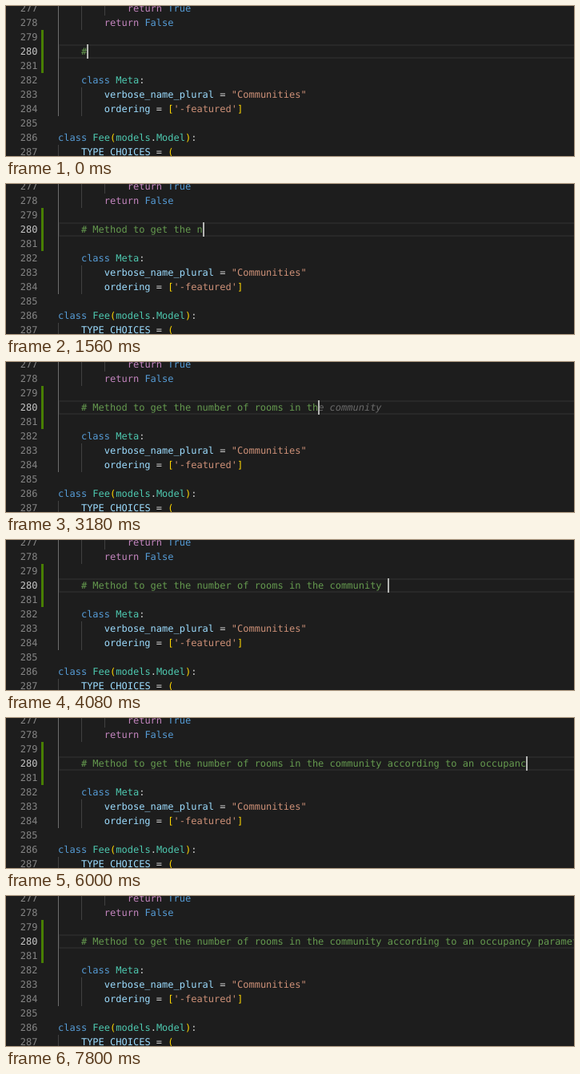
Animation of 710x188 px, one loop 8000 ms. Source, as an HTML page:

```html
<!DOCTYPE html>
<html lang="en">
<head>
<meta charset="utf-8">
<title>Typing a comment</title>
<style>
html, body { margin: 0; width: 100%; height: 100%; overflow: hidden; background: #1d1d1d; }
body { position: relative; }
pre, i.bar { position: absolute; margin: 0; }
pre {
  top: -6px; color: #d4d4d4;
  font: 12px/18px "DejaVu Sans Mono", monospace;
  text-rendering: geometricPrecision; font-variant-ligatures: none;
}
#nums { left: 17.8px; color: #858585; }
#nums b { font-weight: normal; color: #c6c6c6; }
#code { left: 65px; }
#row { position: absolute; left: 65px; right: -4px; top: 48px; height: 14px; border: 2px solid #282828; }
.bar { width: 1px; background: #404040; }
.k { color: #569cd6; }
.f { color: #c586c0; }
.t { color: #4ec9b0; }
.v { color: #9cdcfe; }
.s { color: #ce9178; }
.p { color: #ffd700; }
#typed { color: #659a4f; }
#ghost { color: #6a6a6a; font-style: italic; }
#caret { display: inline-block; position: relative; width: 0; height: 0; }
#caret::after {
  content: ""; position: absolute; left: 0; top: -13px;
  width: 2px; height: 18px; background: #b4b5b3;
}
</style>
</head>
<body>
<div id="row"></div>
<i class="bar" style="left:44px;top:30px;width:3px;height:54px;background:#487e02"></i>
<i class="bar" style="left:65px;top:0;height:138px;background:#6c6c6c"></i>
<i class="bar" style="left:65px;top:174px;height:14px"></i>
<i class="bar" style="left:94px;top:0;height:30px"></i>
<i class="bar" style="left:94px;top:102px;height:36px"></i>
<i class="bar" style="left:123px;top:0;height:12px"></i>
<pre id="nums">277
278
279
<b>280</b>
281
282
283
284
285
286
287</pre>
<pre id="code">            <span class="f">return</span> <span class="k">True</span>
        <span class="f">return</span> <span class="k">False</span>

    <span id="typed"></span><span id="caret"></span><span id="ghost"></span>

    <span class="k">class</span> <span class="t">Meta</span>:
        <span class="v">verbose_name_plural</span> = <span class="s">"Communities"</span>
        <span class="v">ordering</span> = <span class="p">[</span><span class="s">'-featured'</span><span class="p">]</span>

<span class="k">class</span> <span class="t">Fee</span><span class="p">(</span><span class="t">models</span>.<span class="t">Model</span><span class="p">)</span>:
    <span class="v">TYPE_CHOICES</span> = <span class="p">(</span></pre>
<script>
const LOOP = 8000, STEP = 60;
const hint = "# Method to get the number of rooms in the community";
const text = hint + " according to an occupancy parameter";
const hintFrom = 31;
// [time in ms, characters typed]
const keys = [
  [0, 1], [840, 10], [1680, 23], [2340, 31], [3360, 44], [4080, 53], [4200, 54],
  [5040, 66], [5220, 66], [5400, 68], [6000, 77], [6060, 78], [6960, 78],
  [7020, 79], [7260, 79], [7800, 86], [LOOP, 86]
];
const [typed, caret, ghost] = ["typed", "caret", "ghost"].map(id => document.getElementById(id));

function typedCount(t) {
  const i = keys.findIndex(k => k[0] > t);
  const [t0, n0] = keys[i - 1], [t1, n1] = keys[i];
  return Math.floor(n0 + (n1 - n0) * (t - t0) / (t1 - t0) + 1e-6);
}

function draw(now) {
  const ms = now % LOOP;
  const t = Math.min(ms - ms % STEP, 7800);
  const n = typedCount(t);
  typed.textContent = text.slice(0, n);
  ghost.textContent = n >= hintFrom ? hint.slice(n) : "";
  caret.style.visibility = t >= 6660 && t < 7020 ? "hidden" : "visible";
}

const start = performance.now();
function tick() {
  draw(performance.now() - start);
  requestAnimationFrame(tick);
}
tick();
</script>
</body>
</html>
```
